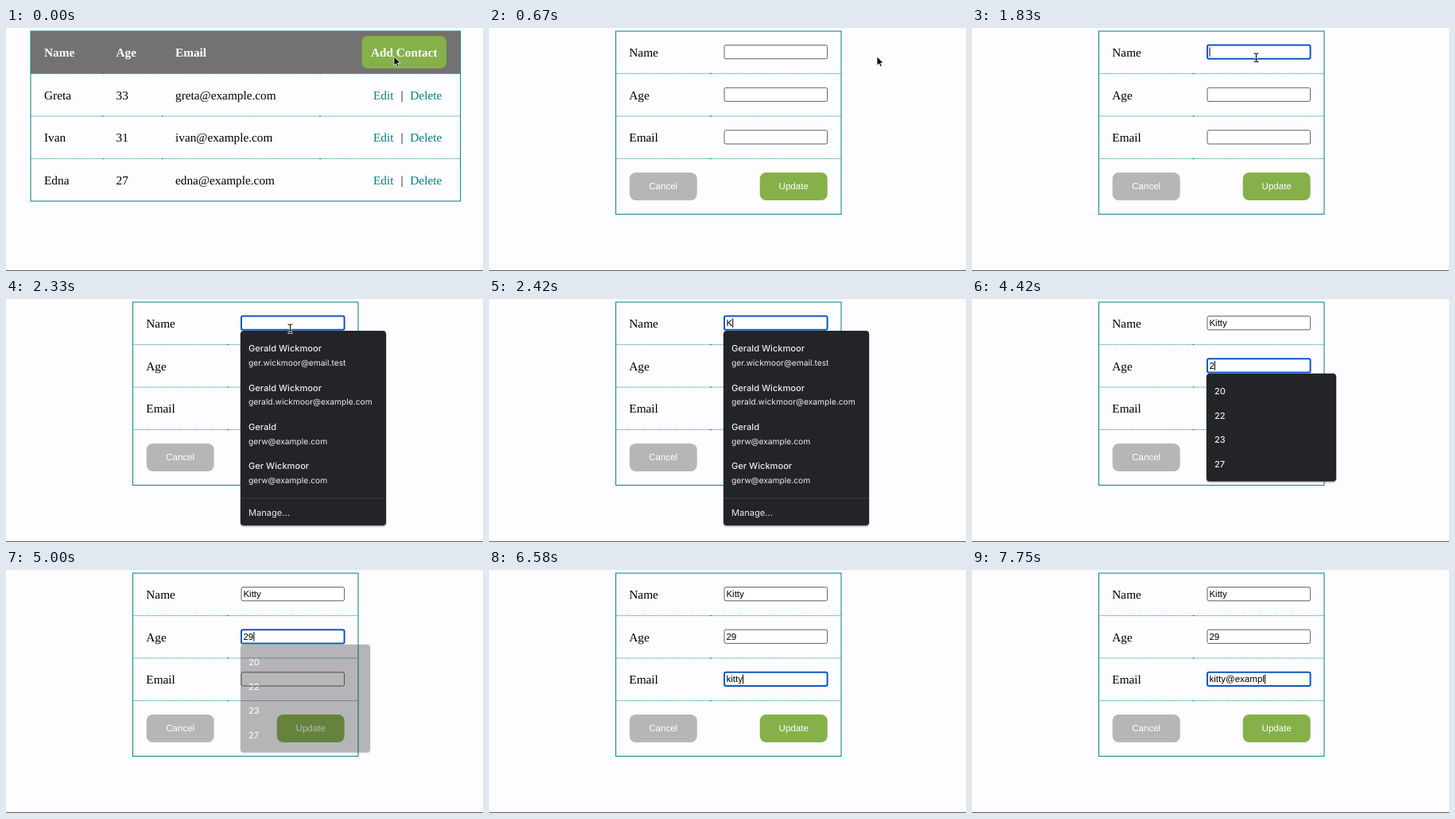
An HTML page for the animation above (8 s loop, 600 by 306 pixels).

```html
<!DOCTYPE html>
<html lang="en">
<head>
<meta charset="utf-8">
<title>Contacts form</title>
<style>
  html, body { margin: 0; width: 100%; height: 100%; overflow: hidden; background: #fdfcfe; }
  svg { display: block; width: 600px; height: 306px; text-rendering: geometricPrecision; }
  .serif { font: 15.3px "Liberation Serif", "Times New Roman", serif; }
  .bold { font-weight: 700; }
  .sans { font: 11.55px "Liberation Sans", Arial, sans-serif; }
  .title { font: 500 11.1px Inter, sans-serif; }
  .detail { font: 10.25px Inter, sans-serif; }
</style>
</head>
<body>
<svg id="stage" viewBox="0 0 600 306"></svg>
<script>
const LOOP = 8000;
const TEAL = '#138d90', LINK = '#087d86', GREEN = '#86b04a', INK = '#000';
const ROW = 53.6, BASELINE = 36;
const stage = document.getElementById('stage');

function add(parent, tag, attrs = {}, text = '') {
  const node = document.createElementNS('http://www.w3.org/2000/svg', tag);
  set(node, attrs);
  node.textContent = text;
  parent.append(node);
  return node;
}
function set(node, attrs) {
  for (const key in attrs) node.setAttribute(key, attrs[key]);
}
const show = (node, visible) => set(node, { visibility: visible ? 'visible' : 'hidden' });
const group = (parent = stage) => add(parent, 'g');
const box = (parent, x, y, width, height, fill, more = {}) =>
  add(parent, 'rect', { x, y, width, height, fill, ...more });
const label = (parent, x, y, text, cls, fill = INK, more = {}) =>
  add(parent, 'text', { x, y, class: cls, fill, ...more }, text);

function button(parent, x, y, width, height, text, fill, cls, baseline) {
  box(parent, x, y, width, height, fill, { rx: 8 });
  label(parent, x + width / 2, baseline, text, cls, '#fff', { 'text-anchor': 'middle' });
}

function frame(parent, x1, x2, y2, joints) {
  for (let row = 1; row < 4; row++) {
    const y = 4 + row * ROW - 0.2;
    add(parent, 'path', { d: `M${x1} ${y}H${x2}`, stroke: TEAL, 'stroke-dasharray': '.9 .83' });
    joints.forEach(x => box(parent, x - 1, y - 0.5, 2, 1, TEAL));
  }
  box(parent, x1, 4, x2 - x1, y2 - 4, 'none', { stroke: TEAL, 'stroke-width': 1.1 });
}

box(stage, 0, 0, 600, 306, '#fdfcfe');
box(stage, 0, 305, 600, 1, '#626262');

// Contact list
const list = group();
box(list, 31, 4, 541, 53.5, '#737172');
frame(list, 31, 571.6, 218, [122, 197, 395]);
const columns = [48, 138.5, 213];
['Name', 'Age', 'Email'].forEach((text, i) =>
  label(list, columns[i], BASELINE, text, 'serif bold', '#fff'));
button(list, 447.5, 10, 106.5, 41, 'Add Contact', GREEN, 'serif bold', BASELINE);
[['Greta', 33], ['Ivan', 31], ['Edna', 27]].forEach(([name, age], i) => {
  const y = BASELINE + (i + 1) * ROW;
  [name, age, `${name.toLowerCase()}@example.com`].forEach((text, c) =>
    label(list, columns[c], y, text, 'serif'));
  label(list, 462, y, 'Edit', 'serif', LINK);
  label(list, 496.6, y, '|', 'serif');
  label(list, 508.3, y, 'Delete', 'serif', LINK);
});

// Contact form
const form = group();
frame(form, 159.5, 443, 234.5, [279]);
const fields = ['Name', 'Age', 'Email'].map((name, i) => {
  const y = i * ROW;
  label(form, 176.3, BASELINE + y, name, 'serif');
  return {
    outline: box(form, 296, 21.6 + y, 129.6, 17.2, '#fff', { rx: 2 }),
    text: label(form, 298.4, 34.2 + y, '', 'sans'),
    caretY: 24.3 + y
  };
});
button(form, 176.7, 182, 85, 35, 'Cancel', '#b7b5b8', 'sans', 203.3);
button(form, 340.7, 182, 85, 35, 'Update', GREEN, 'sans', 203.3);
const caret = box(form, 0, 0, 1, 11.8, INK);

// Autofill menus
function menu(y, width, height) {
  const node = group();
  box(node, 294, y + 0.5, width + 2, height + 1.5, '#000', { rx: 5, opacity: 0.18 });
  box(node, 295, y, width, height, '#232428', { rx: 4 });
  return node;
}
const nameMenu = menu(40, 183, 245.3);
[
  ['Gerald Wickmoor', 'ger.wickmoor@email.test'],
  ['Gerald Wickmoor', 'gerald.wickmoor@example.com'],
  ['Gerald', 'gerw@example.com'],
  ['Ger Wickmoor', 'gerw@example.com']
].forEach(([name, email], i) => {
  label(nameMenu, 305, 66.3 + i * 49.3, name, 'title', '#ececee');
  label(nameMenu, 305, 84 + i * 49.3, email, 'detail', '#ececee');
});
box(nameMenu, 295, 250.5, 183, 1, '#3d3e42');
label(nameMenu, 305, 272.8, 'Manage...', 'title', '#ececee', { style: 'font-weight:400' });

const ageMenu = menu(93.7, 163, 136);
[20, 22, 23, 27].forEach((age, i) =>
  label(ageMenu, 305, 120.2 + i * 30.6, age, 'title', '#ececee'));

// Pointers
const arrow = add(stage, 'path', {
  d: 'M0 0V11.2L2.6 8.8L4.3 12.8L6.2 12L4.5 8.1H8Z',
  fill: INK, stroke: '#fff', 'stroke-width': 0.8
});
const beam = group();
const beamShape = 'M-3 -5.5Q0 -5.5 0 -4Q0 -5.5 3 -5.5M0 -4V4M-3 5.5Q0 5.5 0 4Q0 5.5 3 5.5M-1.6 2H1.6';
[['#fff', 2.6], ['#111', 1.1]].forEach(([stroke, width]) =>
  add(beam, 'path', { d: beamShape, fill: 'none', stroke, 'stroke-width': width }));

// Keyboard script: [time, field, value]
const edits = [[1830, 0, '']];
function type(field, text, times) {
  times.forEach((time, i) => edits.push([time, field, text.slice(0, i + 1)]));
}
type(0, 'Kitty', [2420, 3000, 3080, 3250, 3330]);
edits.push([3420, 1, '']);
type(1, '29', [4330, 4920]);
edits.push([5500, 2, '']);
type(2, 'kitty@exampl',
  [5920, 6250, 6330, 6420, 6580, 7000, 7170, 7330, 7420, 7580, 7670, 7750]);

const clamp = v => Math.max(0, Math.min(1, v));
const ease = v => v * v * (3 - 2 * v);

function drawPointer(t) {
  const step = Math.floor((t + 4) * 0.012);
  const p = ease(clamp((step - 11) / 8));
  const x = 488 - 130.5 * p, y = 36 + 1.3 * p;
  const overField = x < 426;
  show(arrow, !overField);
  show(beam, overField && t < 2420);
  set(arrow, { transform: `translate(${x} ${y})` });
  set(beam, { transform: `translate(${x} ${y})` });
}

function drawFields(t) {
  const values = ['', '', ''];
  let active = -1, since = 0;
  for (const [time, field, value] of edits) {
    if (time > t) break;
    values[field] = value;
    active = field;
    since = time;
  }
  fields.forEach(({ outline, text }, i) => {
    const focused = i === active;
    if (text.textContent !== values[i]) text.textContent = values[i];
    set(outline, { stroke: focused ? '#0b57c4' : '#626064', 'stroke-width': focused ? 2 : 1 });
  });
  const blinkOn = Math.floor((t - since) / 500) % 2 === 0;
  set(caret, { opacity: active >= 0 && blinkOn ? 1 : 0 });
  if (active >= 0) {
    const { text, caretY } = fields[active];
    const width = values[active] ? text.getComputedTextLength() : 0;
    set(caret, { x: 298.5 + width, y: caretY });
  }
}

function fade(node, t, from, to, fadeOut) {
  const opacity = t < from ? 0 : t < to ? 1 : clamp(1 - (t - to) / fadeOut);
  set(node, { opacity });
}

function render(t) {
  const editing = t >= 500;
  set(list, { display: editing ? 'none' : 'inline' });
  set(form, { display: editing ? 'inline' : 'none' });
  drawFields(t);
  fade(nameMenu, t, 1910, 2420, 170);
  fade(ageMenu, t, 4330, 4920, 120);
  drawPointer(t);
}

const start = performance.now();
function tick() {
  render((performance.now() - start) % LOOP);
  requestAnimationFrame(tick);
}
tick();
</script>
</body>
</html>
```
